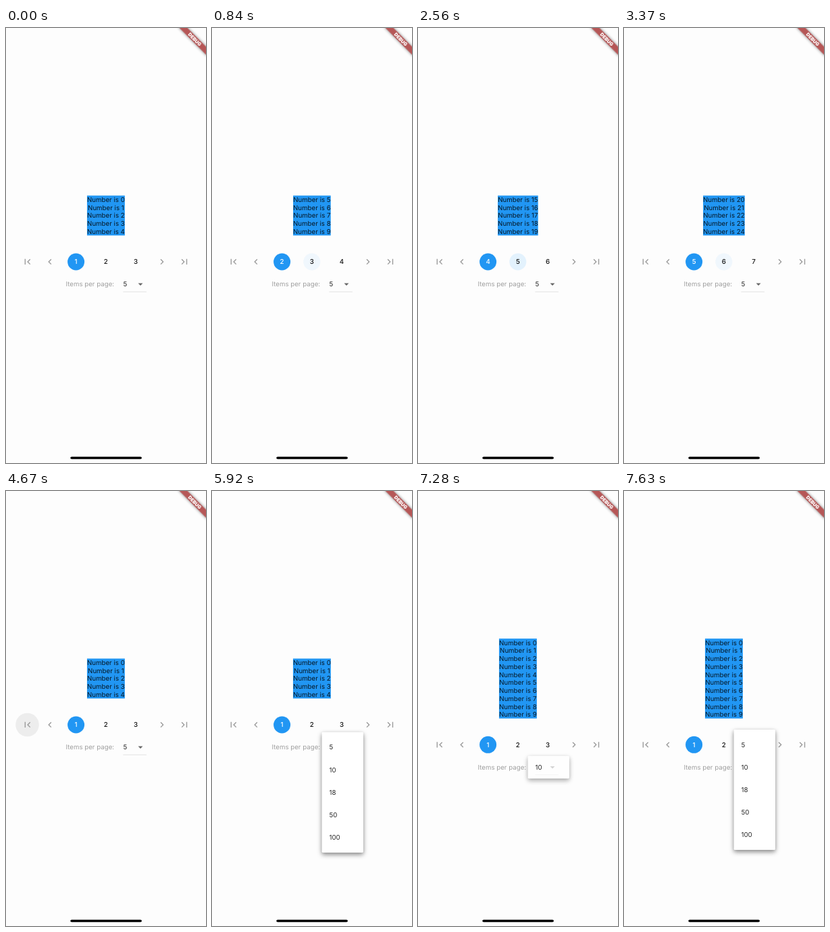
An HTML page that plays this animation: 296 by 640 pixels, repeating every 8 s.

```html
<!DOCTYPE html>
<html lang="en">
<head>
<meta charset="utf-8">
<title>Pagination demo</title>
<style>
  html, body { margin: 0; width: 100%; height: 100%; overflow: hidden; background: #fdfdfd; }
  svg { display: block; width: 296px; height: 640px; }
  text { font: 9.7px Inter, "Open Sans", sans-serif; fill: #000000d9; text-rendering: geometricPrecision; }
  .mid { text-anchor: middle; }
  .page { font-weight: 500; fill: #111; }
  .label { fill: #a0a0a0; }
  .icon { fill: #9b9b9b; }
  .menu { fill: #fff; filter: drop-shadow(0 3px 3.5px #00000066) drop-shadow(0 1px 2px #0000001f); }
  .ribbon { fill: #b65757; filter: drop-shadow(0 0 2px #00000080); }
  .debug { font-size: 7.05px; font-weight: 900; fill: #fff; }
</style>
</head>
<body>
<svg viewBox="0 0 296 640">
  <g id="app"></g>
  <g transform="translate(296 0) rotate(45)">
    <rect class="ribbon" x="-30" y="19.4" width="60" height="8.3"/>
    <text class="mid debug" y="26.1">DEBUG</text>
  </g>
  <rect x="95.3" y="630.7" width="105.6" height="3.6" rx="1.8"/>
</svg>
<script>
const LOOP = 8000, SCALE = 296 / 428, LINE = 11.75, ITEM = 48 * SCALE, PAD = 8 * SCALE;
const CENTER = 275.9, SIZES = [5, 10, 18, 50, 100];
const ICONS = {
  first: 'M18.41 16.59L13.82 12l4.59-4.59L17 6l-6 6 6 6zM6 6h2v12H6z',
  prev: 'M15.41 7.41L14 6l-6 6 6 6 1.41-1.41L10.83 12z',
  next: 'M10 6L8.59 7.41 13.17 12l-4.58 4.59L10 18l6-6z',
  last: 'M5.59 7.41L10.18 12l-4.59 4.59L7 18l6-6-6-6zM16 6h2v12h-2z',
  drop: 'M7 10l5 5 5-5z'
};

// Each step adds to the state before it.
const STEPS = [
  [0, { page: 1, size: 5, glow: 0, splash: 0, first: 0, menu: 0, picked: 0 }],
  [500, { page: 2, glow: 1, splash: 1 }],
  [690, { splash: .3 }],
  [840, { glow: .5, splash: 0 }],
  [950, { glow: 0 }],
  [1570, { page: 3, glow: 1, splash: .6 }],
  [1690, { splash: 1 }],
  [1800, { splash: .5 }],
  [1910, { splash: 0 }],
  [2020, { glow: .5 }],
  [2130, { glow: 0 }],
  [2430, { page: 4, glow: 1, splash: .8 }],
  [2560, { splash: 0 }],
  [2690, { glow: .5 }],
  [2820, { glow: 0 }],
  [3020, { page: 5, glow: 1, splash: .8 }],
  [3140, { splash: 0 }],
  [3370, { glow: .5 }],
  [3500, { glow: 0 }],
  [4670, { page: 1, first: 1 }],
  [4780, { first: 0 }],
  [5610, { menu: .18 }],
  [5720, { menu: .5 }],
  [5820, { menu: .8 }],
  [5920, { menu: 1 }],
  [6560, { size: 10 }],
  [6670, { menu: 0, picked: 1 }],
  [7280, { menu: .18 }],
  [7400, { menu: .5 }],
  [7520, { menu: .8 }],
  [7630, { menu: 1 }]
];

const app = document.getElementById('app');
const clamp = v => Math.max(0, Math.min(1, v));
const mix = (a, b, k) => a + (b - a) * k;
const text = (x, y, value, cls = '', extra = '') =>
  `<text class="${cls}" x="${x}" y="${y + 3.5}" ${extra}>${value}</text>`;
const circle = (x, y, r, fill, opacity = 1) =>
  `<circle cx="${x}" cy="${y}" r="${r}" fill="${fill}" opacity="${opacity}"/>`;
const icon = (name, x, y, fill = '#9b9b9b') =>
  `<path d="${ICONS[name]}" fill="${fill}" transform="translate(${x} ${y}) scale(${SCALE}) translate(-12 -12)"/>`;

function list({ page, size }, top) {
  let out = `<rect id="box" y="${top}" height="${size * LINE}" fill="#2196f3"/>`;
  for (let i = 0; i < size; i++)
    out += text(147.9, top + (i + .5) * LINE, `Number is ${(page - 1) * size + i}`, 'mid line');
  return out;
}

function pager({ page, glow, splash, first }, y) {
  return circle(31.5, y, 17.3, '#ededed', first)
    + icon('first', 31.8, y) + icon('prev', 65, y)
    + circle(103.6, y, 12.5, '#2196f3')
    + circle(147.8, y, 12.5, '#e3f2fd', glow)
    + circle(147.8, y, 12.3, '#e4e7ea', splash)
    + circle(147.8, y, 9.5, '#d5e0e9', splash)
    + [0, 1, 2].map(i => text(103.6 + i * 44.2, y, page + i, 'mid page', i ? '' : 'style="fill:#fff"')).join('')
    + icon('next', 230.8, y) + icon('last', 264, y);
}

function picker({ size }, y) {
  return text(88.5, y, 'Items per page:', 'label')
    + text(173.5, y, size)
    + icon('drop', 199, y, '#666')
    + `<rect x="173.3" y="${y + 10.8}" width="34.5" height=".6" fill="#d0d0d0"/>`;
}

// The panel fades in, grows from the picked row, then shows its rows in turn.
function dropdown({ menu, picked }) {
  if (!menu) return '';
  const rowY = rowCenter(SIZES[picked]) + 33;
  const top = rowY - PAD - (picked + .5) * ITEM;
  const full = SIZES.length * ITEM + 2 * PAD;
  const grow = clamp((menu - .25) / .25);
  const start = PAD + picked * ITEM;
  const from = mix(start, 0, grow), to = mix(start + ITEM, full, grow);
  const unit = .5 / (SIZES.length + 1.5);
  const rows = SIZES.map((n, i) => {
    const shown = i === picked ? 1 : clamp((menu - .5 - (i + 1) * unit) / (1.5 * unit));
    return text(173.5, top + PAD + (i + .5) * ITEM, n, '', `opacity="${shown}"`);
  });
  return `<g opacity="${clamp(menu / .25)}">
    <rect class="menu" x="162.6" y="${top + from}" width="61.3" height="${to - from}" rx="1.4"/>
    ${rows.join('')}</g>`;
}

const rowCenter = size => CENTER + size * LINE / 2 + 38.7;

function render(state) {
  const y = rowCenter(state.size);
  app.innerHTML = list(state, CENTER - state.size * LINE / 2)
    + pager(state, y) + picker(state, y + 33) + dropdown(state);
  const widths = [...app.querySelectorAll('.line')].map(el => el.getComputedTextLength());
  const width = Math.max(...widths), box = document.getElementById('box');
  box.setAttribute('x', 147.9 - width / 2);
  box.setAttribute('width', width);
}

let shown = -1;
const begin = performance.now();
function tick() {
  const time = (performance.now() - begin) % LOOP;
  const past = STEPS.filter(([at]) => at <= time);
  if (past.length !== shown) {
    shown = past.length;
    render(Object.assign({}, ...past.map(step => step[1])));
  }
  requestAnimationFrame(tick);
}
tick();
</script>
</body>
</html>
```
